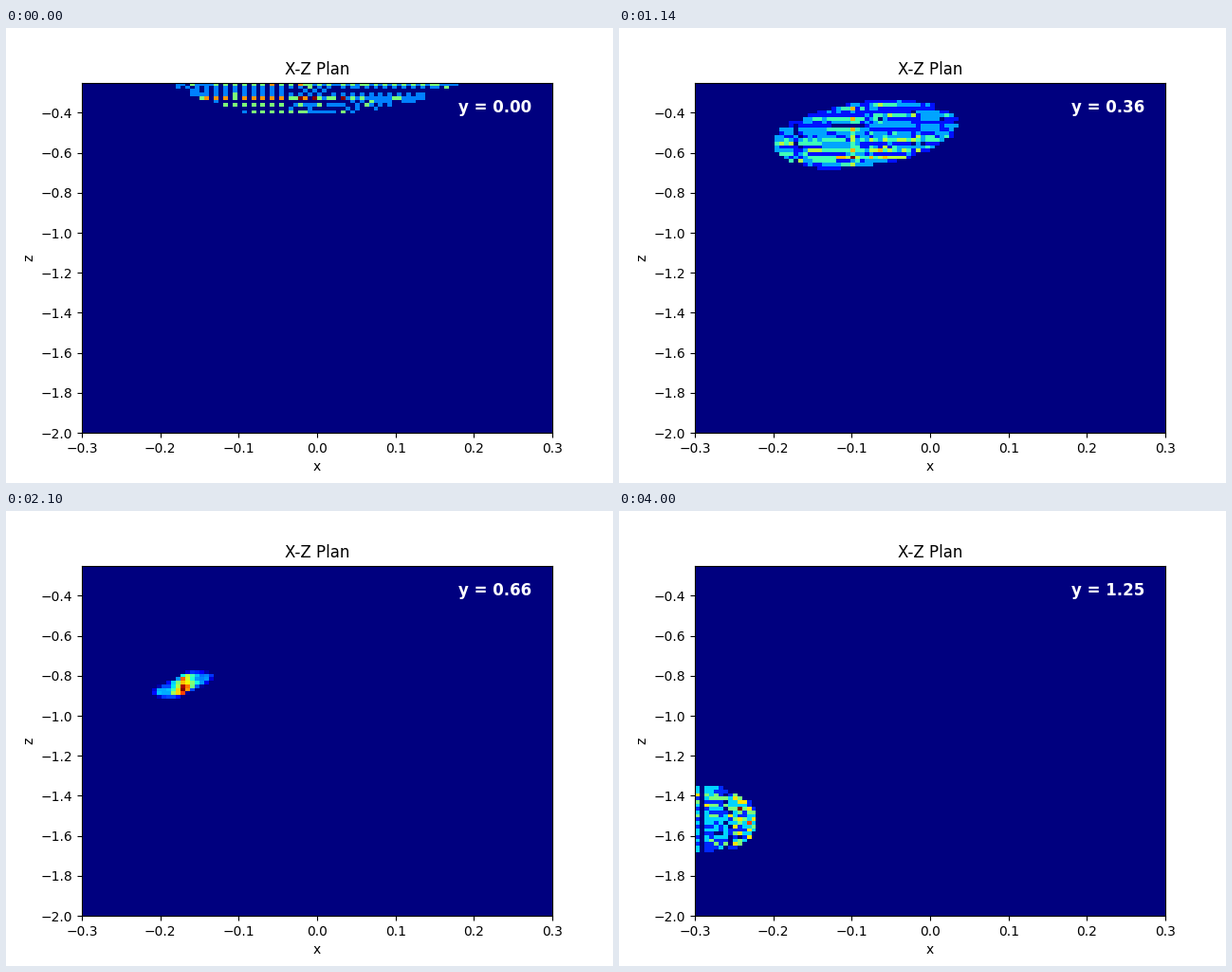
A matplotlib script for the animation above (4020 ms loop, 640 by 480 pixels).

```python
import numpy as np
import matplotlib.pyplot as plt
from matplotlib.animation import FuncAnimation

FRAMES, STEP_MS = 201, 20
Y_END = 1.25
X_LIM, Z_LIM = (-0.3, 0.3), (-2.0, -0.25)
BINS = 100
MIN_PEAK = 4


def gather(a, center, width, pull=0.5):
    """Draw nearby values of a together around center."""
    d = a - center
    return a - pull * d * np.exp(-(d / width) ** 2)


def make_rays(pitch=0.0535, tilt=0.23, skew=0.3, row_noise=0.03, noise=0.004):
    """Grid of rays on the unit disk with uneven, slightly tilted rows."""
    rng = np.random.default_rng(4)
    cols = np.arange(-20, 21) * pitch
    n = np.arange(-25, 26)
    rows = n * pitch
    rows = rows + skew * (rows**2 - 1) / 2 + rng.normal(0, row_noise, n.size)
    rows = gather(rows, -0.2, 0.1)
    u, row = np.meshgrid(cols, rows)
    # Columns line up on the left; odd rows shift half a step on the right.
    shift = 1 / (1 + np.exp(-8 * (u + 0.1)))
    u = gather(u + (n % 2)[:, None] * shift * pitch / 2, -0.15, 0.12)
    u = u + rng.normal(0, noise, u.shape)
    v = row - tilt * u + rng.normal(0, noise, u.shape)
    inside = u**2 + v**2 <= 1
    return u[inside], v[inside]


def hit_points(y):
    """Where the converging rays cross the plane at height y."""
    x = 0.02 - 0.29 * y + (0.212 - 0.265 * y) * U - 0.03 * y * (U - U**3)
    z = -0.11 - 1.12 * y + (0.295 - 0.38 * y) * V + (0.06 - 0.03 * y) * U
    return x, z


def density(y):
    x, z = hit_points(y)
    return np.histogram2d(z, x, bins=BINS, range=(Z_LIM, X_LIM))[0]


U, V = make_rays()

fig, ax = plt.subplots(figsize=(6.4, 4.8), dpi=100)
image = ax.imshow(density(0), cmap="jet", origin="lower", aspect="auto",
                  interpolation="nearest", extent=(*X_LIM, *Z_LIM))
label = ax.text(0.18, -0.4, "", color="white", fontsize=12, weight="bold")
ax.set(title="X-Z Plan", xlabel="x", ylabel="z", xlim=X_LIM, ylim=Z_LIM)


def update(i):
    y = Y_END * i / (FRAMES - 1)
    counts = density(y)
    image.set_data(counts)
    image.set_clim(0, max(counts.max(), MIN_PEAK))
    label.set_text(f"y = {y:.2f}")
    return image, label


anim = FuncAnimation(fig, update, frames=FRAMES, interval=STEP_MS,
                     repeat=True, repeat_delay=0)
plt.show()
```
